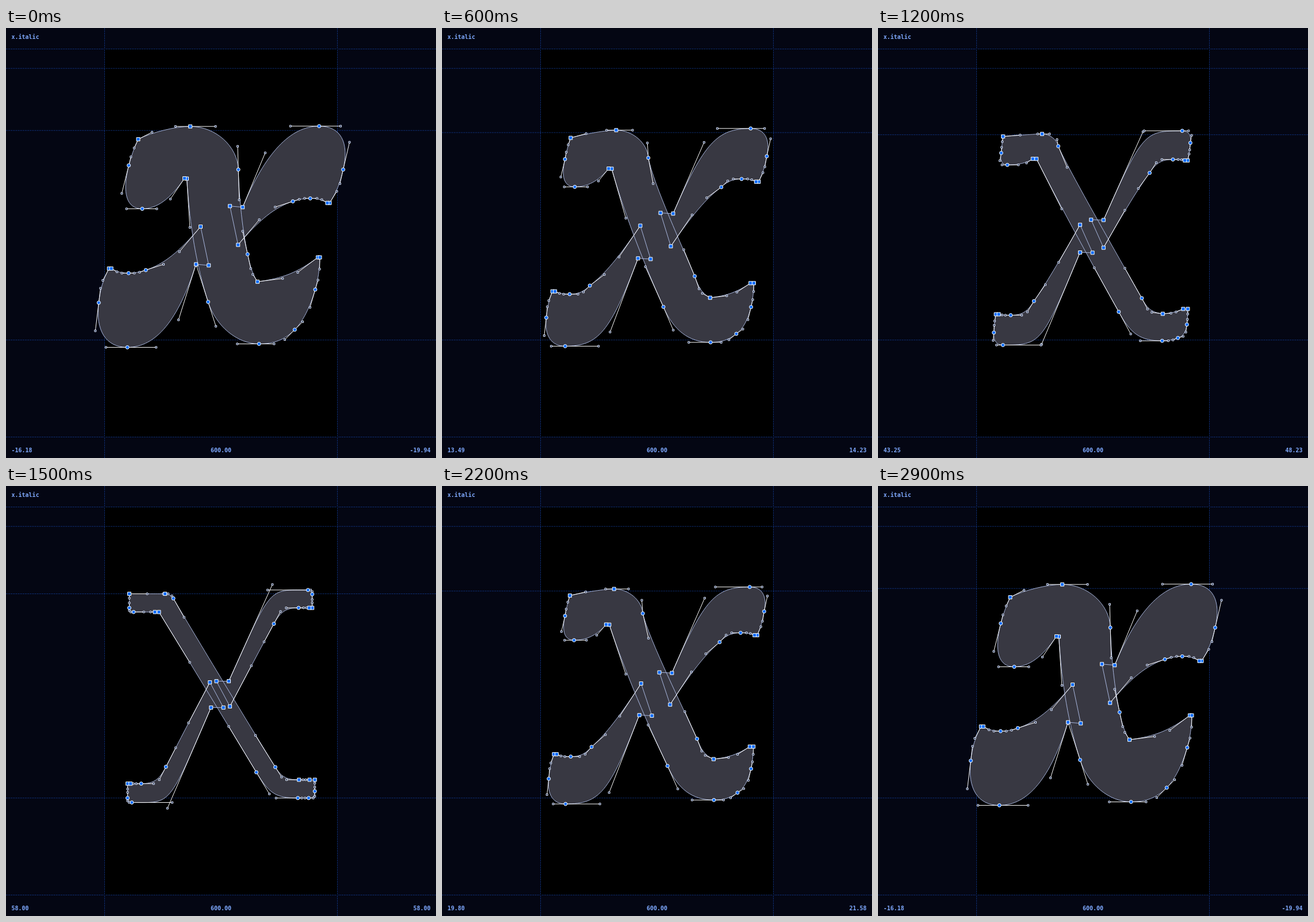
These frames come from a looping animation (748x748 px, 3000 ms). An HTML page with a canvas:

```html
<!DOCTYPE html>
<html lang="en">
<head>
<meta charset="utf-8">
<title>x.italic</title>
<style>
html, body { margin: 0; width: 100%; height: 100%; overflow: hidden; background: #040613; }
canvas { display: block; }
</style>
</head>
<body>
<canvas id="stage" width="748" height="748"></canvas>
<script>
const ctx = document.getElementById('stage').getContext('2d');
const HEAVY = 0, LIGHT = 1;

const mix = (a, b, s) => a + (b - a) * s;
const mixPoint = (p, q, s) => ({ x: mix(p.x, q.x, s), y: mix(p.y, q.y, s) });

// An outline is a rounded polygon, each vertex given for the heavy and then the light master.
// corner: sharp node. bend: rounded vertex with a tension. smooth: node part way along an edge.
const vertex = (x, y, lightX, lightY) => [{ x, y }, { x: lightX, y: lightY }];
const corner = (...xy) => ({ kind: 'square', at: vertex(...xy) });
const bend = (x, y, lx, ly, k, lightK = k) => ({ kind: 'off', at: vertex(x, y, lx, ly), k: [k, lightK] });
const smooth = (t, lightT, kind = 'circle') => ({ kind, t: [t, lightT] });

const stem = [
  corner(230, 193.5, 214.5, 187.5),
  bend(273.7, 171.2, 271, 187.5, .55),
  smooth(.365, .365, 'square'),
  bend(402, 171.2, 286.6, 187.5, .54),
  smooth(.473, .068),
  bend(406.6, 330, 353.3, 305, .63, .3),
  smooth(.667, .893),
  bend(427.2, 425.2, 482.3, 511, .79),
  corner(437.5, 441.3, 509.7, 511),
  bend(495.8, 433.8, 519, 511, .75),
  corner(542.5, 399, 528, 511),
  corner(546, 399, 537.2, 511),
  bend(545.3, 430, 537.2, 520, .66),
  smooth(.341, .48),
  bend(523.8, 503.3, 537.2, 542.8, .64, .75),
  smooth(.465, .543),
  bend(477.6, 549.5, 517.5, 542.8, .7),
  smooth(.364, .178),
  bend(374.9, 549.5, 462.5, 542.8, .58, .84),
  smooth(.444, .252),
  bend(322.3, 385, 355.3, 365, .69, .6),
  corner(314.5, 262, 266, 219.2),
  corner(310.5, 261.5, 259, 219.2),
  bend(274.3, 314.5, 248, 219.2, .68),
  smooth(.469, .776),
  bend(194.7, 314.5, 214.5, 219.2, .645),
  smooth(.77, .356),
  bend(219.2, 216.5, 214.5, 199, .66)
];

const arm = [
  corner(411.7, 311.7, 387.5, 339.5),
  bend(470.2, 170.7, 459.1, 180.9, .67, 1.06),
  smooth(.557, .9),
  bend(604, 170.7, 532.7, 180.9, .63),
  smooth(.704, .381),
  bend(579.2, 278.1, 532.7, 200.3, .77),
  corner(563, 304.3, 532.7, 212),
  corner(559, 304.3, 527.5, 212),
  bend(545.6, 296.4, 521, 212, .72),
  smooth(.533, .3),
  bend(515, 296.4, 481, 212, .69, .77),
  smooth(.269, .385),
  bend(455.6, 315.6, 442, 284, .71),
  corner(403.7, 377.2, 389.5, 383.4),
  corner(389.5, 309.8, 366, 339.5)
];

// Turns the polygon of one master into nodes and off-curve handles.
function trace(outline, master) {
  const wrap = i => outline[(i + outline.length) % outline.length];
  const place = i => {
    const v = wrap(i);
    return v.at ? v.at[master] : mixPoint(place(i - 1), place(i + 1), v.t[master]);
  };
  return outline.flatMap((v, i) => {
    const p = place(i);
    if (v.kind !== 'off') return { kind: v.kind, ...p };
    return [i - 1, i + 1].map(n => ({ kind: 'off', ...mixPoint(place(n), p, v.k[master]) }));
  });
}

// The lower arm is the upper one turned by half a circle and leaned a little.
function turn({ kind, x, y }, master) {
  const rise = Math.max(0, 300 - y);
  return master === HEAVY
    ? { kind, x: 742.2 + .106 * rise - x, y: 722.7 + .027 * rise - y }
    : { kind, x: 744.2 - x, y: 724.9 + .055 * rise - y };
}

const masters = [HEAVY, LIGHT].map(master => {
  const upper = trace(arm, master);
  return [trace(stem, master), upper, upper.map(p => turn(p, master))];
});

// [time, share of the light master] and [share, right side bearing]
const motion = [[0, 0], [600, .4], [1000, .6685], [1500, 1], [2200, .48504], [2600, .2099], [2900, 0]];
const bearing = [[0, -19.94], [.2099, -2.13], [.4, 14.23], [.48504, 21.58], [.6685, 36.87], [.9, 56.7], [1, 58]];

function lookup(keys, x) {
  const i = Math.max(1, keys.findIndex(key => key[0] >= x));
  const [x0, y0] = keys[i - 1], [x1, y1] = keys[i];
  return mix(y0, y1, (x - x0) / (x1 - x0));
}

function line(x0, y0, x1, y1) {
  ctx.beginPath();
  ctx.moveTo(x0, y0);
  ctx.lineTo(x1, y1);
  ctx.stroke();
}

function label(text, x, y, align) {
  ctx.textAlign = align;
  ctx.fillText(text, x, y);
}

function addOutline(path, points) {
  const at = i => points[i % points.length];
  path.moveTo(points[0].x, points[0].y);
  for (let i = 1; i <= points.length; i++) {
    const p = at(i);
    if (p.kind === 'off') {
      const q = at(i + 1), end = at(i + 2);
      path.bezierCurveTo(p.x, p.y, q.x, q.y, end.x, end.y);
      i += 2;
    } else path.lineTo(p.x, p.y);
  }
  path.closePath();
}

function drawHandles(points) {
  points.forEach((p, i) => {
    if (p.kind !== 'off') return;
    const before = points[i - 1];
    const node = before.kind !== 'off' ? before : points[(i + 1) % points.length];
    line(node.x, node.y, p.x, p.y);
  });
}

function drawPoint({ kind, x, y }) {
  const off = kind === 'off', r = off ? 1.5 : 3;
  ctx.beginPath();
  if (kind === 'circle') ctx.arc(x, y, r, 0, 2 * Math.PI);
  else ctx.rect(x - r, y - r, 2 * r, 2 * r);
  ctx.fillStyle = off ? '#10203f' : '#0a6cff';
  ctx.strokeStyle = off ? '#e2eaff' : '#fff';
  ctx.fill();
  ctx.stroke();
}

function draw(time) {
  const s = time >= 2900 ? 0 : lookup(motion, time);
  ctx.fillStyle = '#040613';
  ctx.fillRect(0, 0, 748, 748);
  ctx.fillStyle = '#000';
  ctx.fillRect(171.5, 36.5, 405, 675);

  ctx.lineWidth = 1;
  ctx.strokeStyle = '#1a5ae0';
  ctx.setLineDash([1, 2]);
  for (const y of [36.5, 70.25, mix(178.25, 187.5, s), 542.75, 711.5]) line(0, y, 748, y);
  for (const x of [171.5, 576.5]) line(x, 0, x, 748);
  ctx.setLineDash([]);

  const outlines = masters[HEAVY].map((points, i) =>
    points.map((p, j) => ({ kind: p.kind, ...mixPoint(p, masters[LIGHT][i][j], s) })));
  const path = new Path2D();
  outlines.forEach(points => addOutline(path, points));
  ctx.fillStyle = '#383842';
  ctx.fill(path);
  ctx.lineWidth = .9;
  ctx.strokeStyle = '#b4c3ee';
  ctx.stroke(path);
  ctx.lineWidth = 1;
  ctx.strokeStyle = '#fff';
  outlines.forEach(drawHandles);
  outlines.flat().forEach(drawPoint);

  ctx.font = 'bold 10px "DejaVu Sans Mono", monospace';
  ctx.fillStyle = '#7fa9ff';
  label('x.italic', 9.5, 18.5, 'left');
  label(mix(-16.18, 58, s).toFixed(2), 9.5, 737.5, 'left');
  label('600.00', 374, 737.5, 'center');
  label(lookup(bearing, s).toFixed(2), 738.5, 737.5, 'right');
}

function tick() {
  draw(Math.floor(performance.now() % 3000 / 100) * 100);
  requestAnimationFrame(tick);
}
tick();
</script>
</body>
</html>
```
